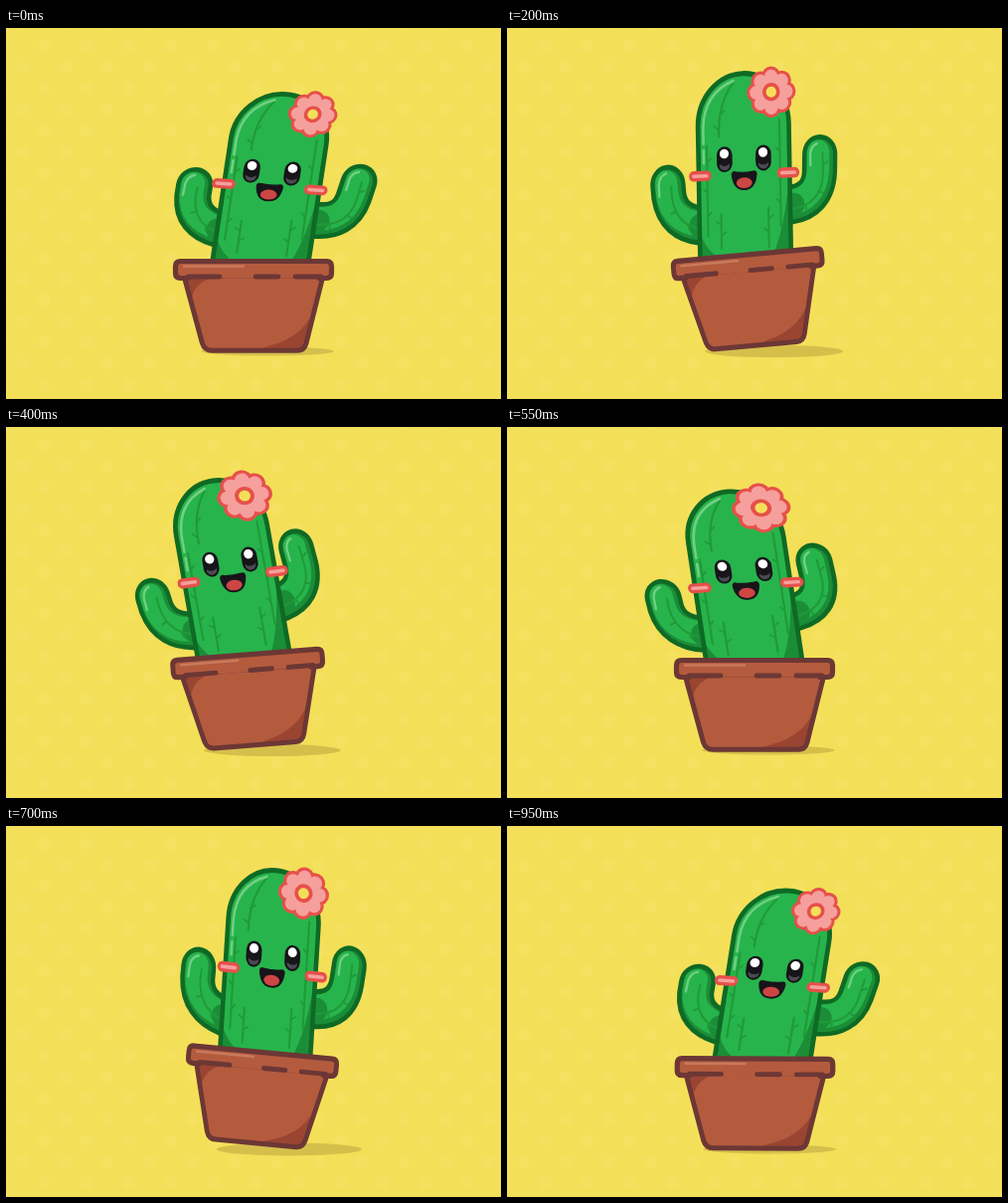
Write an HTML page with a canvas that moves like this. It is 498 px wide and 373 px high and loops after 1 s.

```html
<!DOCTYPE html>
<html lang="en">
<head>
<meta charset="utf-8">
<title>Dancing cactus</title>
<style>
  html, body { margin: 0; width: 100%; height: 100%; overflow: hidden; background: #f4df58; }
  canvas { display: block; width: 498px; height: 373px; }
</style>
</head>
<body>
<canvas id="stage" width="498" height="373"></canvas>
<script>
const ctx = document.getElementById('stage').getContext('2d');
const W = 498, H = 373, LOOP = 1000, STEP = 50;
const RAD = Math.PI / 180;
const C = {
  bg: '#f4df58', dot: '#f5e160', shadow: '#d5bf4b',
  edge: '#0e6a24', leaf: '#27b44c', shade: '#1b8d37', rib: '#209a38', shine: '#72cf83',
  clay: '#b45b3e', clayDark: '#9a4531', clayLight: '#c97a5c', brown: '#6c3735',
  ink: '#17151a', grey: '#4b4a52', red: '#e6504a', tongue: '#cc4643', pink: '#f5a09d'
};

// Pose keys over one loop
const TIMES = [0, 200, 400, 550, 700, 850, 950];
const POSE = {
  x:       [256.5, 240, 238.5, 248.2, 261, 262, 257.5],
  lean:    [8.6, -1, -10, -8.6, 3.6, 9.2, 9],
  tilt:    [4, -2.4, -7.5, -3.6, 6.3, 7.5, 4.2],
  stretch: [1.005, 1.08, 1.052, 1.015, 1.085, 1.05, 1.012],
  look:    [-2, 0, 3, 3, 2, -2, -2],
  bloom:   [1, 1.04, 1.17, 1.19, 1.09, 1.04, 1]
};

// Periodic cubic through the keys
function sample(vals, t) {
  const n = TIMES.length;
  const time = i => TIMES[(i + n) % n] + Math.floor(i / n) * LOOP;
  const val = i => vals[(i + n) % n];
  let i = n - 1;
  while (TIMES[i] > t) i--;
  const slope = k => (val(k + 1) - val(k - 1)) / (time(k + 1) - time(k - 1));
  const d = time(i + 1) - time(i), u = (t - time(i)) / d, v = 1 - u;
  return v * v * (1 + 2 * u) * val(i) + u * u * (3 - 2 * u) * val(i + 1)
       + d * u * v * (v * slope(i) - u * slope(i + 1));
}

// Hop height 0..1, first to the left, then to the right
function hop(t) {
  if (t < 550) return Math.pow(Math.sin(Math.PI * t / 550), 0.8);
  const u = Math.min(1, (t - 550) / 410);
  return Math.max(0, Math.sin(Math.PI * Math.pow(u, 0.75)));
}

function fill(p, color) { ctx.fillStyle = color; ctx.fill(p); }

function stroke(p, color, width) {
  ctx.strokeStyle = color;
  ctx.lineWidth = width;
  ctx.stroke(p);
}

function fillInside(clip, p, color) {
  ctx.save();
  ctx.clip(clip);
  fill(p, color);
  ctx.restore();
}

function oval(x, y, rx, ry) {
  const p = new Path2D();
  p.ellipse(x, y, rx, ry, 0, 0, Math.PI * 2);
  return p;
}

function box(x, y, w, h, r) {
  const p = new Path2D();
  p.roundRect(x, y, w, h, r);
  return p;
}

function at(x, y, draw) {
  ctx.save();
  ctx.translate(x, y);
  draw();
  ctx.restore();
}

const rim = box(-78.5, -92.5, 157, 17, 5);
const rimEdge = new Path2D('M-66 -75.5 H-73.5 Q-78.5 -75.5 -78.5 -80.5 V-87.5 Q-78.5 -92.5 -73.5 -92.5 ' +
  'H73.5 Q78.5 -92.5 78.5 -87.5 V-80.5 Q78.5 -75.5 73.5 -75.5 H66');
const rimDashes = new Path2D('M-66 -77 H-34 M2 -77 H25 M42 -77 H68');
const rimShine = new Path2D('M-70 -87.5 H-10');
const tub = new Path2D('M-70 -78 L-51.5 -10 Q-49 -2.7 -42 -2.7 H44 Q51 -2.7 53 -10 L70 -78 Z');
const tubShade = new Path2D('M70 -78 L64 -52 Q54 -16 14 -7 Q6 -4 0 -2.5 H60 Z M-72 -78 H-34 Q-58 -74 -62 -56 Z');
const body = new Path2D('M-48 14 V-118 A48 48 0 0 1 48 -118 V14 Z');
const bodyShade = new Path2D('M50 -95 Q45 -28 30 2 V16 H50 Z M-50 -26 Q-44 -6 -32 2 V16 H-50 Z');
const ribs = new Path2D(
  'M-39 -100 V-16 M38 -122 V-22 M-10 -158 Q-27 -138 -26 -108 ' +
  'M-25 -36 V-4 M25 -40 V-4');
const ticks = new Path2D(
  'M-39 -84 l4 -4 M-39 -56 l-4 -4 M-39 -34 l4 -4 M38 -92 l-4 -4 M38 -66 l4 -4 M38 -44 l-4 -4 ' +
  'M-25 -128 l5 -4 M-26 -114 l-5 -4 M-25 -26 l-5 -3 M-25 -16 l5 -3 M25 -30 l5 -3 M25 -18 l-5 -3');
const bodyShine = new Path2D('M-42.5 -84 V-96 M-42.5 -102 V-117 Q-41 -149 -10 -159.5');
const leftArm = {
  line: new Path2D('M-30 -24 L-46 -26 Q-76 -31 -79 -56 L-79.5 -66.5'),
  rib: new Path2D('M-48 -23 Q-73 -29 -76 -55 L-76 -65 M-60 -28 l1 5 M-72 -41 l-5 2'),
  shine: new Path2D('M-89 -56 L-89 -67 Q-88 -75 -81 -77'),
  root: new Path2D('M-46 -26 H-48'),
  x: -46, y: -27
};
const rightArm = {
  line: new Path2D('M30 -42 L48 -42 Q78 -45 79.5 -72 L80 -88'),
  rib: new Path2D('M50 -38 Q82 -42 83 -70 L83 -89 M83 -78 l5 -3 M78 -54 l5 2 M64 -42 l1 5'),
  shine: new Path2D('M70 -78 L70 -89 Q71 -96 77 -98'),
  root: new Path2D('M46 -42 H52'),
  x: 48, y: -43
};
const mouth = new Path2D('M-13 -5 Q-13 -8.5 -9 -7.5 Q0 -6 9 -7.5 Q13 -8.5 13 -5 Q11.5 9 0 9 Q-11.5 9 -13 -5 Z');
const petals = new Path2D();
for (let i = 0; i < 8; i++) {
  const a = i * Math.PI / 4;
  const x = 15 * Math.cos(a), y = 15 * Math.sin(a);
  petals.moveTo(x + 6.6, y);
  petals.arc(x, y, 6.6, 0, Math.PI * 2);
}

function drawBackground() {
  ctx.fillStyle = C.bg;
  ctx.fillRect(0, 0, W, H);
  const gap = 21.3;
  for (let row = 0; row < 19; row++) {
    for (let col = 0; col < 13; col++) {
      fill(oval(17 + (col * 2 - row % 2) * gap, 18 + (row - 1) * gap, 6.5, 6.5), C.dot);
    }
  }
}

function drawShadow(h, right) {
  fill(oval(263 + (right ? 22 : 6) * h, 325, 66.5 + (right ? 6.5 : 3) * h, 4.5 + 2 * h), C.shadow);
}

function drawPot(h, right) {
  at(249 + h, 327 - 5.5 * h, () => {
    ctx.rotate((right ? 5.4 : -5.6) * h * RAD);
    ctx.scale(1 - 0.05 * h, 1 + 0.02 * h);
    fill(tub, C.clay);
    fillInside(tub, tubShade, C.clayDark);
    stroke(tub, C.brown, 5);
    fill(rim, C.clay);
    stroke(rimShine, C.clayLight, 2.5);
    stroke(rimDashes, C.brown, 4.8);
    stroke(rimEdge, C.brown, 5.2);
  });
}

function drawArm(arm, angle) {
  at(arm.x, arm.y, () => {
    ctx.rotate(angle * RAD);
    ctx.translate(-arm.x, -arm.y);
    stroke(arm.line, C.edge, 37);
    stroke(arm.line, C.shade, 28);
    at(-1.6, -1.6, () => stroke(arm.line, C.leaf, 23.5));
    stroke(arm.root, C.shade, 22);
    stroke(arm.rib, C.rib, 2);
    stroke(arm.shine, C.shine, 2.4);
  });
}

function drawEye(x) {
  at(x, -86.8, () => {
    fill(box(-8.2, -12, 16.4, 24, 8.2), C.ink);
    fill(oval(0, 5.5, 5.4, 4.6), C.grey);
    fill(oval(0, 2.5, 5.8, 3.8), C.ink);
    fill(oval(-0.3, -5.2, 4.8, 4.5), '#fff');
  });
}

function drawFace(look) {
  at(look, 0, () => {
    for (const side of [-1, 1]) {
      drawEye(side * 20.5);
      const cheek = box(side * 46.5 - 10.2, -75.4, 20.4, 6.6, 3.3);
      fill(cheek, C.pink);
      stroke(cheek, C.red, 3.2);
    }
    at(0, -67, () => {
      fill(mouth, C.ink);
      fill(oval(0, 2.8, 8.4, 5), C.tongue);
      stroke(mouth, C.ink, 1.2);
    });
  });
}

function drawFlower(bloom) {
  at(30, -147.7, () => {
    ctx.scale(bloom * 1.01, 0.96 + (bloom - 1) * 0.25);
    stroke(petals, C.red, 6);
    fill(petals, C.pink);
    fill(oval(0, 0, 16, 16), C.pink);
    const eye = oval(0, 0, 7, 7);
    fill(eye, C.bg);
    stroke(eye, C.red, 3.6);
  });
}

function drawPlant(t, h) {
  const get = key => sample(POSE[key], t);
  const lean = get('lean'), tilt = get('tilt');
  const sx = 1 - 0.05 * h, sy = get('stretch');
  ctx.save();
  ctx.transform(
    sx * Math.cos(tilt * RAD), sx * Math.sin(tilt * RAD),
    -sy * Math.sin(lean * RAD), sy * Math.cos(lean * RAD),
    get('x'), 231.5 - 7 * h);
  drawArm(leftArm, tilt * 0.75);
  drawArm(rightArm, lean * 0.85 + 1);
  fill(body, C.leaf);
  fillInside(body, bodyShade, C.shade);
  stroke(ribs, C.rib, 2.2);
  stroke(ticks, C.rib, 1.6);
  stroke(bodyShine, C.shine, 2.6);
  stroke(body, C.edge, 4.8);
  drawFace(get('look'));
  drawFlower(get('bloom'));
  ctx.restore();
}

function render(t) {
  const h = hop(t), right = t >= 550;
  drawBackground();
  drawShadow(h, right);
  drawPlant(t, h);
  drawPot(h, right);
}

ctx.lineCap = ctx.lineJoin = 'round';
const start = performance.now();
function tick() {
  const t = (performance.now() - start) % LOOP;
  render(Math.floor(t / STEP) * STEP);
  requestAnimationFrame(tick);
}
tick();
</script>
</body>
</html>
```
